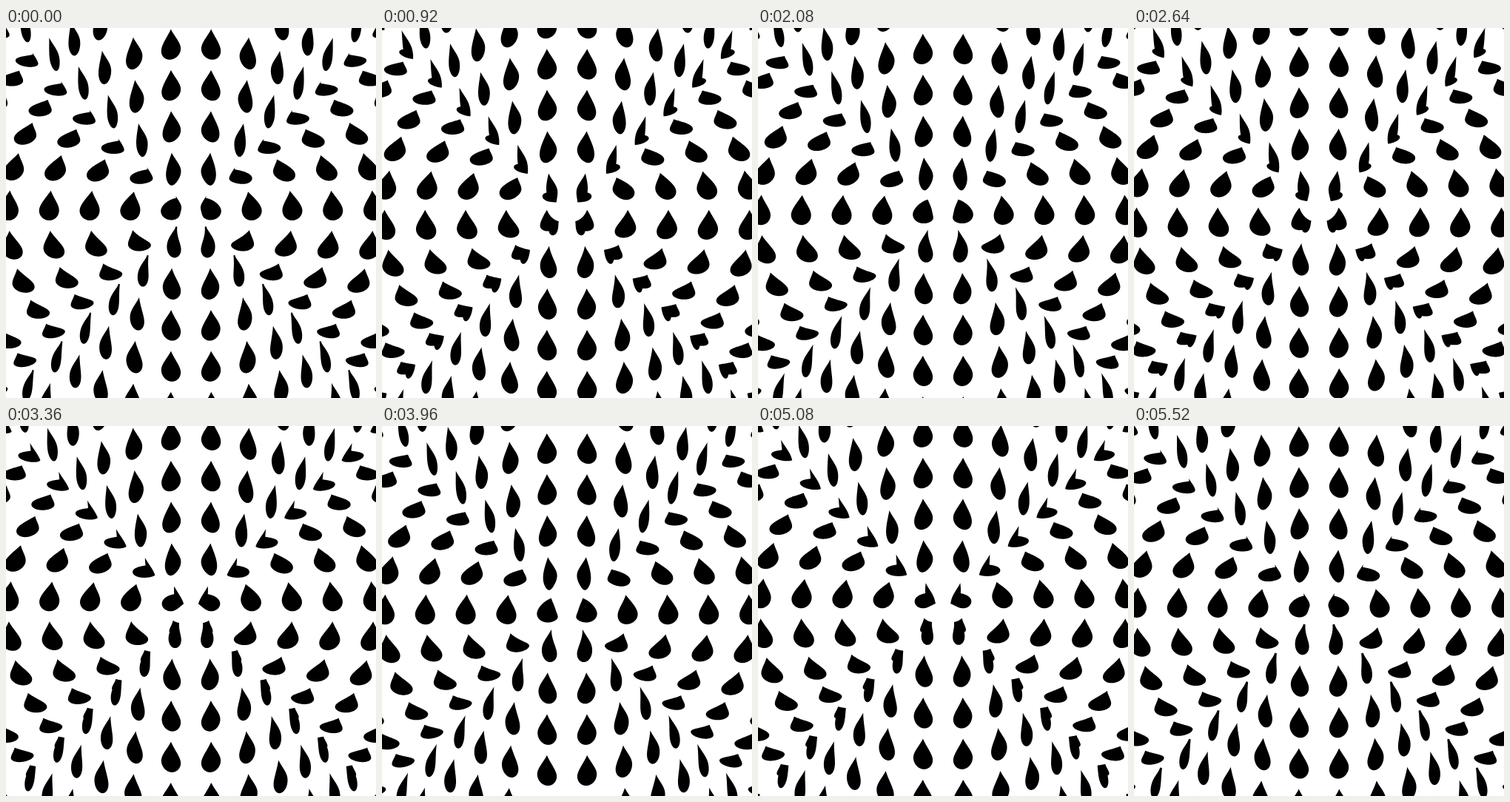
An HTML page with a canvas for the animation above (5.56 s loop, 500 px wide and 500 px high).

```html
<!DOCTYPE html>
<html lang="en">
<head>
<meta charset="utf-8">
<title>Warped drops</title>
<style>
  html, body { margin: 0; width: 100%; height: 100%; overflow: hidden; background: #fff; }
  canvas { display: block; width: 500px; height: 500px; }
</style>
</head>
<body>
<canvas id="stage" width="500" height="500"></canvas>
<script>
const ctx = document.getElementById('stage').getContext('2d');
const CELL = 54.8, RADIUS = 13.5, TIP = 27.3, BASE_Y = -3.4;
const STEP = 40, STEPS = 139, ROWS_PER_LOOP = 3, EASE = 0.0146;

const bezier = (a, b, c, d, t) => {
  const s = 1 - t;
  return s * s * s * a + 3 * s * s * t * b + 3 * s * t * t * c + t * t * t * d;
};

// Outline of one drop around the centre of its round part
const right = [];
for (let i = 0; i <= 40; i++) {
  const t = i / 40;
  right.push([bezier(0, 5, RADIUS, RADIUS, t), bezier(-TIP, -17, -8, 0, t)]);
}
for (let i = 1; i <= 40; i++) {
  const a = i / 40 * Math.PI / 2;
  right.push([RADIUS * Math.cos(a), RADIUS * Math.sin(a)]);
}
const drop = [...right, ...right.slice(1, -1).reverse().map(([x, y]) => [-x, y])];

// Bends concentric squares into concentric circles
function warp(x, y) {
  const k = Math.max(Math.abs(x), Math.abs(y)) / (Math.hypot(x, y) || 1);
  return [250 + x * k, 250 + y * k];
}

function addDrop(cx, cy) {
  drop.forEach(([x, y], i) => {
    const p = warp(cx + x, cy + y);
    if (i) ctx.lineTo(...p);
    else ctx.moveTo(...p);
  });
  ctx.closePath();
}

function draw(progress) {
  // The fall is slightly slower around the start of the loop
  const rows = progress * ROWS_PER_LOOP - EASE * Math.sin(progress * 2 * Math.PI);
  const shift = (rows % 1) * CELL + BASE_Y;
  ctx.fillStyle = '#fff';
  ctx.fillRect(0, 0, 500, 500);
  ctx.fillStyle = '#000';
  ctx.beginPath();
  for (let col = -7; col < 7; col++) {
    for (let row = -8; row <= 8; row++) addDrop((col + 0.5) * CELL, row * CELL + shift);
  }
  ctx.fill();
}

const start = performance.now();
function tick() {
  const step = Math.floor((performance.now() - start) / STEP) % STEPS;
  draw(step / STEPS);
  requestAnimationFrame(tick);
}
tick();
</script>
</body>
</html>
```
